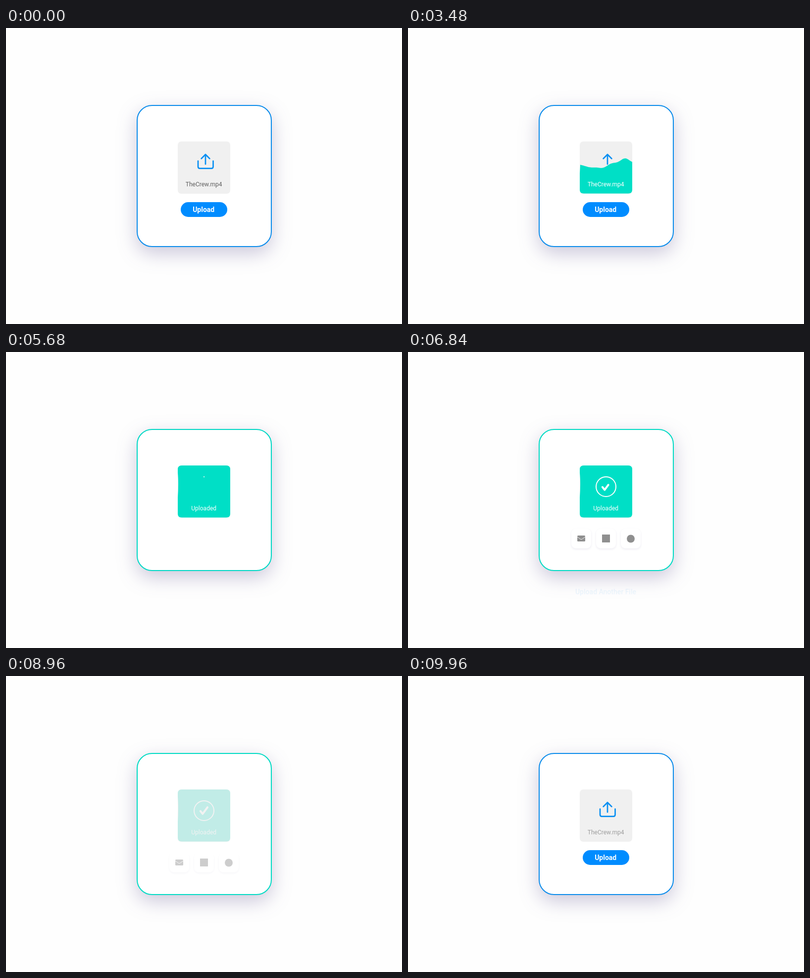
An HTML page that plays this animation: 800x600 px, repeating every 10 s.

```html
<!DOCTYPE html>
<html lang="en">
<head>
<meta charset="utf-8">
<title>Upload card</title>
<style>
  html, body { margin: 0; width: 100%; height: 100%; overflow: hidden; background: #fefefe; }
  svg { display: block; width: 800px; height: 600px; }
  text { font-family: Roboto, "Open Sans", sans-serif; text-anchor: middle; }
  .small { font-size: 12px; }
  .label { font-size: 14px; }
  .line { fill: none; stroke: #0a90f2; stroke-width: 2.7; stroke-linecap: round; stroke-linejoin: round; }
  .white { stroke: #fff; }
  #card { fill: #fff; stroke-width: 2; filter: drop-shadow(0 13px 19px rgba(60, 45, 120, .26)); }
  .tile { fill: #fff; filter: drop-shadow(0 2px 2px rgba(60, 45, 120, .2)); }
</style>
</head>
<body>
<svg viewBox="0 0 800 600">
  <defs>
    <clipPath id="boxClip">
      <path d="M355 230H445Q453 230 453 238V328Q453 335.6 445 335.6H355Q347 335.6 347 328V295Q349 265 347 245V238Q347 230 355 230Z"/>
    </clipPath>
    <clipPath id="waveClip"><path id="waveEdge"/></clipPath>
  </defs>

  <rect id="card" x="265" y="157" width="271" height="286" rx="30"/>
  <rect x="347" y="230" width="106" height="106" rx="7" fill="#f0f0f0"/>

  <text id="name" class="small" x="399.7" y="321" fill="#606060">TheCrew.mp4</text>
  <path id="tray" class="line" pathLength="1" d="M388 269.5V281Q388 284.6 391.6 284.6H414.9Q418.5 284.6 418.5 281V269.5"/>
  <path id="arrow" class="line" d="M403 276V256.5M394.6 264.7L403 256.2L411.4 264.7"/>

  <g id="fill">
    <path id="wave" fill="#00dfc6" clip-path="url(#boxClip)"/>
    <g clip-path="url(#waveClip)">
      <text id="nameLight" class="small" x="399.7" y="321" fill="#fff">TheCrew.mp4</text>
    </g>
    <text id="done" class="small" x="399.7" y="321" fill="#fff">Uploaded</text>
    <circle id="circle" class="line white" style="stroke-width:2" pathLength="1" cx="400" cy="273" r="20" transform="rotate(-90 400 273)"/>
    <path id="check" class="line white" style="stroke-width:4" pathLength="1" d="M392.8 273.8L397.3 279.4L407 266.2"/>
  </g>

  <g id="button">
    <rect id="pill" x="353" y="353" width="94" height="30" rx="15" fill="#008cff"/>
    <text id="pillText" class="label" x="399.2" y="373" font-weight="700" fill="#fff">Upload</text>
  </g>

  <g id="share">
    <rect class="tile" x="330" y="358" width="40" height="40" rx="9"/>
    <rect class="tile" x="380" y="358" width="40" height="40" rx="9"/>
    <rect class="tile" x="430" y="358" width="40" height="40" rx="9"/>
    <rect x="342" y="372" width="16" height="12" rx="1.6"/>
    <path d="M341.5 374.6L348.6 379.4Q350 380.2 351.4 379.4L358.5 374.6" fill="none" stroke="#fff" stroke-width=".9"/>
    <rect x="392" y="370" width="16" height="16"/>
    <circle cx="450" cy="378.5" r="8"/>
  </g>

  <text id="again" class="label" x="399.5" y="490.5" font-weight="500" fill="#0d8de6">Upload Another File</text>
  <circle id="tap" fill="none" stroke="#2cc6cf" stroke-width="1.2"/>
</svg>

<script>
const LOOP = 10000;
const el = {};
document.querySelectorAll('[id]').forEach(e => el[e.id] = e);

const set = (id, attrs) => { for (const k in attrs) el[id].setAttribute(k, attrs[k]); };
const clamp = v => Math.min(1, Math.max(0, v));
const ramp = (t, a, b) => clamp((t - a) / (b - a));
const ease = v => v * v * (3 - 2 * v);
const smooth = (t, a, b) => ease(ramp(t, a, b));
const fade = (id, v) => set(id, { opacity: v, visibility: v > 0 ? 'visible' : 'hidden' });
const mix = (a, b, k) => `rgb(${a.map((v, i) => Math.round(v + (b[i] - v) * k))})`;
const BLUE = [10, 140, 235], TEAL = [0, 219, 196];

// Shows `len` of a path (0 to 1) starting at `start`
function trim(id, start, len) {
  set(id, {
    'stroke-dasharray': `${Math.max(len, .001)} 2`,
    'stroke-dashoffset': -start,
    visibility: len < 0 ? 'hidden' : 'visible'
  });
}

function wavePath(t) {
  const level = 336 - (t - 1847) * .0381;
  const amp = ramp(t, 2080, 3480);
  const drift = (t - 3480) / 1600;
  const wave = (u, peak, len, speed) => Math.cos(2 * Math.PI * ((u - peak) / len - drift * speed));
  let d = 'M347 340';
  for (let x = 347; x <= 453; x += 2) {
    const u = (x - 347) / 106;
    const h = -8 * wave(u, .86, 1.2, 1) + 1.8 * wave(u, .52, .75, 1.2) + 2.5 * u * wave(u, .44, .28, 1);
    d += `L${x} ${(level + amp * (h + 2.4)).toFixed(2)}`;
  }
  return d + 'V340Z';
}

function drawTap(t) {
  const second = t >= 8180;
  const start = second ? 8180 : 510;
  const k = ramp(t, start, start + 440);
  set('tap', { cx: second ? 397.5 : 396.8, cy: second ? 485.5 : 362.5, r: 21.4 + 4.6 * k });
  fade('tap', t < start ? 0 : .9 * (1 - k));
}

function draw(t) {
  const reset = smooth(t, 8400, 9180);
  const left = 1 - reset;

  const teal = smooth(t, 4700, 5800) * (1 - smooth(t, 9440, 9940));
  set('card', { stroke: mix(BLUE, TEAL, teal) });

  // Tray shrinks to a dot, then grows back at the end
  const late = t > 5000;
  const trayLen = late ? smooth(t, 9480, 9900) : 1 - smooth(t, 600, 1700);
  trim('tray', (1 - trayLen) / 2, late && t < 9480 ? -1 : trayLen);

  const bob = t > 1560 && t < 3480 ? (1 - Math.cos((t - 1560) / 640 * 2 * Math.PI)) / 2 : 0;
  set('arrow', { transform: `translate(0 ${-13 * bob})` });
  fade('arrow', late ? ramp(t, 9275, 9960) : 1);
  fade('name', late ? ramp(t, 9910, 10000) : 1 - smooth(t, 4700, 5000));

  const path = wavePath(Math.min(t, 5200));
  set('wave', { d: path });
  set('waveEdge', { d: path });
  fade('fill', t < 1840 ? 0 : left);
  fade('nameLight', t < 1840 ? 0 : 1 - smooth(t, 4700, 5100));
  fade('done', smooth(t, 5100, 5560));

  const shown = left > 0;
  trim('circle', 0, t > 5660 && shown ? smooth(t, 5660, 6640) : -1);
  trim('check', 0, t > 6560 && shown ? smooth(t, 6560, 6940) : -1);

  const button = late ? ramp(t, 9200, 9440) : 1 - smooth(t, 4700, 5000);
  fade('pill', button);
  fade('pillText', button);

  fade('share', smooth(t, 6640, 7080) * left);
  fade('again', smooth(t, 6760, 7240) * (1 - smooth(t, 8320, 8900)));
  drawTap(t);
}

// Visible children would ignore a hidden parent, so the group is dropped by opacity
function tick() {
  draw(performance.now() % LOOP);
  requestAnimationFrame(tick);
}
tick();
</script>
</body>
</html>
```
